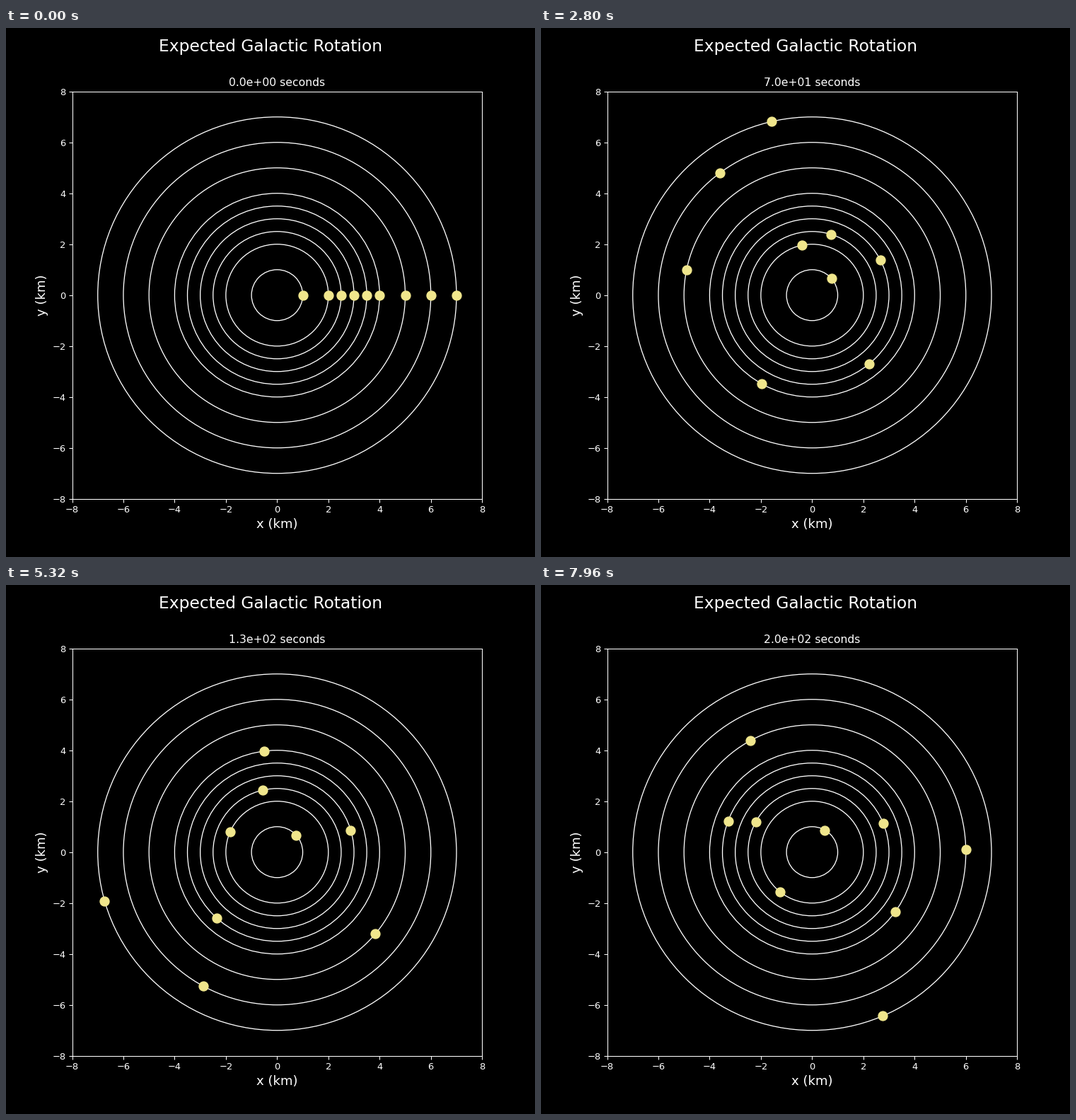
These frames come from a looping animation (748x748 px, 8000 ms). A matplotlib script:

```python
import numpy as np
import matplotlib.pyplot as plt
from matplotlib.animation import FuncAnimation
from matplotlib.patches import Circle

plt.style.use("dark_background")
plt.rcParams["font.family"] = "DejaVu Sans"

FRAMES, INTERVAL = 200, 40

# Orbit radii (km) and orbital speeds (km/s)
radii = np.array([1, 2, 2.5, 3, 3.5, 4, 5, 6, 7])
speeds = np.array([0.10, 0.23, 0.27, 0.29, 0.27, 0.24, 0.21, 0.19, 0.18])
omega = speeds / radii

fig, ax = plt.subplots(figsize=(8, 8), dpi=93.5, facecolor="black")
fig.suptitle("Expected Galactic Rotation", fontsize=18)
ax.set(xlim=(-8, 8), ylim=(-8, 8))
ax.set_xlabel("x (km)", fontsize=14)
ax.set_ylabel("y (km)", fontsize=14)
title = ax.set_title("", fontsize=12)

for r in radii:
    ax.add_patch(Circle((0, 0), r, fill=False, ec="white", lw=1))
stars, = ax.plot([], [], "o", color="khaki", ms=10, zorder=3)


def update(t):
    angle = omega * t
    stars.set_data(radii * np.cos(angle), radii * np.sin(angle))
    title.set_text(f"{t:.1e} seconds")
    return stars, title


anim = FuncAnimation(fig, update, frames=FRAMES, interval=INTERVAL,
                     repeat=True, repeat_delay=0, blit=False)
plt.show()
```
